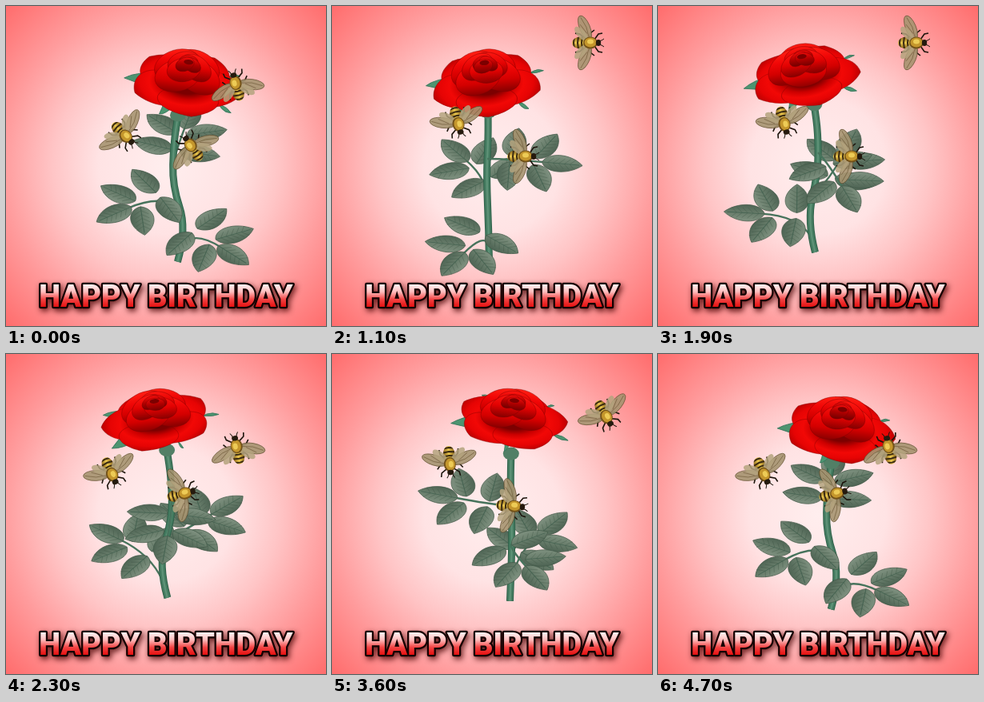
Recreate the animation shown at these times as an HTML page with a canvas. Size 400 by 400 pixels, loop 4.8 s.

```html
<!DOCTYPE html>
<html lang="en">
<head>
<meta charset="utf-8">
<title>Happy Birthday</title>
<style>
html, body { margin: 0; width: 100%; height: 100%; overflow: hidden; background: #ff8a8a; }
canvas { display: block; width: 400px; height: 400px; }
</style>
</head>
<body>
<canvas id="stage" width="400" height="400"></canvas>
<script>
const ctx = document.getElementById('stage').getContext('2d');
const { cos, sin, PI } = Math;
const rad = d => d * PI / 180;
const mid = (a, b) => [(a[0] + b[0]) / 2, (a[1] + b[1]) / 2];
const AXIS = 209;

// Height on screen, distance from the turning axis, bearing in degrees.
const STEM = [[312, 14.5, 68], [270, 23, 42], [215, 16, 94], [165, 14, 88], [128, 16, 68]];
const BRANCHES = [
  { y: 264, bearing: 42, shift: 0, joint: 0 },
  { y: 228, bearing: 148, shift: -14, joint: 1 },
  { y: 190, bearing: 285, shift: -22, joint: 2 }
];
// Base of each leaflet along and across its branch, and its direction.
const LEAFLETS = [[36, 5, 86], [36, -5, -86], [66, 6, 64], [66, -6, -64], [76, 0, 0]];
// One x, y, heading per step of the flight.
const BEES = [
  [[147, 160, 45], [153, 161, 57], [158, 156, 65], [157, 144, 75], [147, 134, 85], [135, 129, 92], [127, 135, 92], [131, 147, 66]],
  [[233, 177, -125], [241, 173, -22], [246, 180, -10], [238, 188, 0], [224, 190, 5], [211, 188, 0], [207, 180, -12], [220, 175, -14]],
  [[288, 100, -105], [264, 70, 60], [285, 45, 20], [319, 46, 0], [341, 75, 60], [323, 115, 160], [288, 134, -90], [289, 119, -102]]
];

function local(x, y, angle, draw) {
  ctx.save();
  ctx.translate(x, y);
  ctx.rotate(angle);
  draw();
  ctx.restore();
}

function oval(x, y, rx, ry, fill, turn = 0) {
  ctx.beginPath();
  ctx.ellipse(x, y, rx, ry, turn, 0, 2 * PI);
  ctx.fillStyle = fill;
  ctx.fill();
}

function outline(color, width) {
  ctx.strokeStyle = color;
  ctx.lineWidth = width;
  ctx.stroke();
}

function line(color, width, ...points) {
  ctx.beginPath();
  points.forEach(p => ctx.lineTo(...p));
  outline(color, width);
}

function fillStops(gradient, colors) {
  colors.forEach((c, i) => gradient.addColorStop(i / (colors.length - 1), c));
  return gradient;
}

const ramp = (x0, y0, x1, y1, ...colors) =>
  fillStops(ctx.createLinearGradient(x0, y0, x1, y1), colors);

function background() {
  const g = ctx.createRadialGradient(200, 200, 0, 200, 200, 283);
  [[0, '#ffeeee'], [.3, '#ffe3e4'], [.5, '#ffc5c6'], [.72, '#ff9c9d'], [1, '#ff6c6c']]
    .forEach(s => g.addColorStop(...s));
  ctx.fillStyle = g;
  ctx.fillRect(0, 0, 400, 400);
}

function leaflet() {
  ctx.beginPath();
  ctx.moveTo(0, 0);
  ctx.bezierCurveTo(5, -18, 33, -21, 51, 0);
  ctx.bezierCurveTo(33, 21, 5, 18, 0, 0);
  ctx.fillStyle = ramp(0, -15, 0, 15, '#7f9180', '#677c6a', '#4d6353');
  ctx.fill();
  outline('#435a49', .8);
  for (let x = 7; x < 38; x += 7)
    line('rgba(52,74,58,.4)', .8, [x + 7, -9], [x, 0], [x + 7, 9]);
  line('#466352', 1.1, [0, 0], [47, 0]);
}

function branch({ y, bearing, shift, joint }, turn, stem) {
  const a = turn + rad(bearing), flat = .7;
  const at = u => [AXIS + u * cos(a), y + flat * u * sin(a)];
  ctx.beginPath();
  ctx.moveTo(...mid(stem[joint], stem[joint + 1]));
  ctx.quadraticCurveTo(...at(34 + shift), ...at(80 + shift));
  outline('#47735c', 2.4);
  ctx.save();
  ctx.translate(AXIS, y);
  ctx.scale(1, flat);
  ctx.rotate(a);
  LEAFLETS.forEach(([u, v, d]) => local(u + shift, v, rad(d), leaflet));
  ctx.restore();
}

function drawStem(p) {
  const strokes = [['#2f6049', 9], ['#447b60', 7], ['#5d9176', 2.5]];
  for (const [color, width] of strokes) {
    ctx.beginPath();
    ctx.moveTo(...p[0]);
    for (let i = 1; i < 4; i++) ctx.quadraticCurveTo(...p[i], ...mid(p[i], p[i + 1]));
    ctx.lineTo(...p[4]);
    outline(color, width);
  }
  oval(...p[4], 10, 8, '#527f66');
}

function sepal(a) {
  const x = cos(a), y = sin(a);
  ctx.beginPath();
  ctx.moveTo(42 * x - 8 * y, 6 + 20 * y + 9 * x);
  ctx.quadraticCurveTo(64 * x, 32 * y - 1, 78 * x, 8 + 38 * y);
  ctx.quadraticCurveTo(60 * x, 12 + 35 * y, 42 * x + 8 * y, 6 + 20 * y - 9 * x);
  ctx.fillStyle = '#4d9470';
  ctx.fill();
  outline('#34745a', .8);
}

// Angles around a ring, the farthest petal first.
const ring = (count, turn) => Array.from({ length: count }, (_, i) => turn + i * 2 * PI / count)
  .sort((a, b) => sin(a) - sin(b));

function skirt(turn) {
  ctx.save();
  ctx.translate(0, 4);
  ctx.scale(1, .55);
  const shade = fillStops(ctx.createRadialGradient(0, 0, 22, 0, 0, 71),
    ['#7c0000', '#cc0000', '#f20806', '#e60404', '#b80000']);
  for (const a of ring(5, turn)) local(0, 0, a, () => {
    ctx.beginPath();
    ctx.moveTo(0, 0);
    ctx.bezierCurveTo(20, -62, 60, -40, 70, -3);
    ctx.bezierCurveTo(62, 38, 20, 62, 0, 0);
    ctx.fillStyle = shade;
    ctx.fill();
    outline('rgba(130,0,0,.5)', 1);
  });
  ctx.restore();
}

function cup(count, reach, rx, ry, cy, turn, colors) {
  for (const a of ring(count, turn)) {
    const x = reach * cos(a), y = cy + reach * .45 * sin(a);
    oval(x, y, rx, ry, ramp(x, y - ry, x, y + ry, ...colors), .5 * cos(a));
    outline('rgba(120,0,0,.5)', .8);
  }
}

function flower(turn) {
  const a = turn + rad(45);
  local(208 + 25 * cos(a), 86 + 10 * sin(a), .16 * cos(a), () => {
    ctx.scale(1, 1 + .07 * sin(a));
    for (let i = 0; i < 5; i++) sepal(turn + rad(40 + 72 * i));
    skirt(turn + .2);
    cup(4, 18, 29, 19, -11, turn + .7, ['#ff1c12', '#f00606', '#d40000', '#900000']);
    cup(3, 10, 21, 14, -16, turn, ['#fb1610', '#e20202', '#8c0000']);
    cup(3, 5, 12, 8, -20, turn + .5, ['#ee0c0a', '#b00000', '#780000']);
    oval(0, -22, 6, 3, '#7c0000');
  });
}

function wing(side) {
  ctx.save();
  ctx.scale(1, side);
  local(3, 4, rad(112), () => {
    oval(16, 0, 16, 6.5, 'rgba(166,148,112,.9)');
    outline('rgba(92,74,44,.8)', .8);
    line('rgba(98,78,44,.75)', .7, [0, 0], [16, -2], [30, 0]);
    line('rgba(98,78,44,.75)', .7, [8, 0], [22, 4]);
  });
  local(-1, 4, rad(132), () => oval(10, 0, 11, 5, 'rgba(180,163,126,.85)'));
  ctx.restore();
}

function bee([x, y, heading]) {
  local(x, y, rad(heading), () => {
    for (const s of [-1, 1]) {
      line('#1c140c', 1.6, [9, 4 * s], [14, 11 * s], [19, 12 * s]);
      line('#1c140c', 1.6, [3, 5 * s], [4, 12 * s], [9, 16 * s]);
      line('#1c140c', 1.8, [-3, 5 * s], [-9, 11 * s], [-15, 12 * s]);
      line('#1c140c', 1, [14, 2 * s], [18, 3 * s], [21, 5 * s]);
    }
    oval(-8, 0, 11, 7.5, ramp(0, -7, 0, 7, '#8a641a', '#ecc950', '#8a641a'));
    ctx.save();
    ctx.clip();
    for (const i of [-16, -11, -6]) line('#3a2a12', 2, [i, -8], [i - 1, 0], [i, 8]);
    ctx.restore();
    wing(-1);
    wing(1);
    oval(4, 0, 9, 7.5, '#73521a');
    oval(4, -.5, 7.5, 6, '#c4962c');
    oval(4, -1.5, 4, 3, '#edcb56');
    oval(14, 0, 3.2, 4, '#251a0e');
  });
}

function greeting() {
  const text = 'HAPPY BIRTHDAY';
  ctx.save();
  ctx.font = '900 38px Roboto, sans-serif';
  ctx.textAlign = 'center';
  ctx.lineJoin = 'round';
  ctx.lineWidth = 4.5;
  ctx.strokeStyle = '#150000';
  ctx.shadowColor = 'rgba(70,0,0,.9)';
  ctx.shadowBlur = 7;
  ctx.shadowOffsetX = 2;
  ctx.shadowOffsetY = 3;
  ctx.strokeText(text, 200, 375.5);
  ctx.shadowColor = 'transparent';
  ctx.fillStyle = ramp(0, 348, 0, 376, '#fff4f4', '#ffbcbc', '#f24444', '#e41010');
  ctx.fillText(text, 200, 375.5);
  ctx.restore();
}

function frame() {
  const step = Math.floor(performance.now() / 100) % 48;
  const turn = step / 48 * 2 * PI;
  const stem = STEM.map(([y, r, d]) => {
    const a = turn + rad(d);
    return [AXIS + r * cos(a), y + .57 * r * sin(a)];
  });
  const depth = b => sin(turn + rad(b.bearing));
  const sorted = [...BRANCHES].sort((a, b) => depth(a) - depth(b));

  background();
  sorted.filter(b => depth(b) < 0).forEach(b => branch(b, turn, stem));
  drawStem(stem);
  sorted.filter(b => depth(b) >= 0).forEach(b => branch(b, turn, stem));
  flower(turn);
  BEES.forEach(path => bee(path[step % 8]));
  greeting();
  requestAnimationFrame(frame);
}
frame();
</script>
</body>
</html>
```
